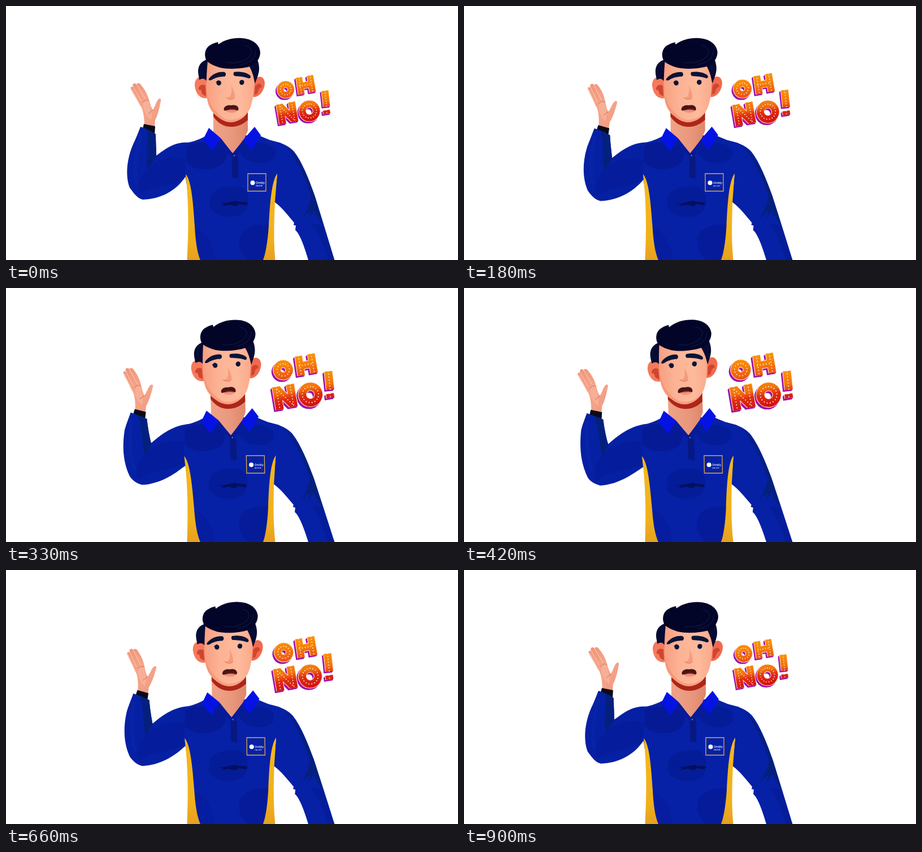
Recreate the animation shown at these times as an HTML page. Size 800 by 450 pixels, loop 0.93 s.

```html
<!DOCTYPE html>
<html lang="en">
<head>
<meta charset="utf-8">
<title>Oh no!</title>
<style>
html, body { margin: 0; width: 100%; height: 100%; overflow: hidden; background: #fff; }
svg { display: block; width: 100vw; height: 100vh; }
.line { fill: none; stroke-linecap: round; stroke-linejoin: round; }
.badge text { font-family: "Open Sans", sans-serif; font-weight: 600; fill: #fff; }
#sign use { fill: none; stroke-linejoin: round; stroke-linecap: butt; }
</style>
</head>
<body>
<svg viewBox="0 0 800 450" preserveAspectRatio="xMidYMid meet">
  <defs>
    <linearGradient id="face" x1="0" x2="1">
      <stop offset="0" stop-color="#f79f80"/><stop offset=".3" stop-color="#fcb294"/>
      <stop offset=".7" stop-color="#feba9c"/><stop offset="1" stop-color="#faa98a"/>
    </linearGradient>
    <linearGradient id="skin" x1="0" x2="1" y1="0" y2="1">
      <stop offset="0" stop-color="#f09378"/><stop offset=".5" stop-color="#f5a68b"/><stop offset="1" stop-color="#f09a80"/>
    </linearGradient>
    <linearGradient id="throat" x1="0" x2="1">
      <stop offset="0" stop-color="#f0a287"/><stop offset=".6" stop-color="#e8977c"/><stop offset="1" stop-color="#dd866b"/>
    </linearGradient>
    <linearGradient id="gold" x1="0" x2="0" y1="0" y2="1">
      <stop offset="0" stop-color="#f5b81c"/><stop offset=".75" stop-color="#f0b01c"/><stop offset="1" stop-color="#e6a020"/>
    </linearGradient>
    <linearGradient id="warm1" gradientUnits="userSpaceOnUse" x1="508" x2="514" y1="122" y2="163">
      <stop offset="0" stop-color="#fb9a08"/><stop offset=".45" stop-color="#f88208"/><stop offset="1" stop-color="#e84a16"/>
    </linearGradient>
    <linearGradient id="warm2" gradientUnits="userSpaceOnUse" x1="521" x2="530" y1="158" y2="208">
      <stop offset="0" stop-color="#fb9208"/><stop offset=".4" stop-color="#f27310"/><stop offset=".6" stop-color="#e02c12"/><stop offset="1" stop-color="#d00c10"/>
    </linearGradient>
    <path id="oh" d="M495 138.500a9.500 9.500 0 1 0 .1 0ZM518.500 126.500L523 156.500M538 123L543 152.500M520 142L541 138"/>
    <path id="no" d="M484 174L490 209M505.500 170L511.500 204.500M485.500 178L509.500 201M537 173.500a12.500 12.500 0 1 0 .1 0ZM564.500 150L567.500 178M567 184.500L568 191"/>
    <clipPath id="sleeveClip"><path class="sleeve"/></clipPath>
    <clipPath id="shirtClip">
      <path id="shirtShape" d="M354 230C343 236 333 240 321 242L317 299C325 345 330 390 333 450H466C466 390 470 340 480 297L487 243C473 240 460 235 447 229Z"/>
    </clipPath>
  </defs>

  <g id="hand">
    <path fill="url(#skin)" d="M245 213C245 198 243 186 239 178C232 166 224 154 221 147C219.500 143 223 141.500 226 145L224 141C224.500 136 229 136 231 139C232 135.500 237 136.500 239 140C245 147 250 155 253 166C255 173 257 180 260 184C264 178 266 169 269 166C272 162.500 275 164 274 168C272 179 269 193 264 202L263 215Z"/>
    <path fill="#f8b59c" d="M243 170C249 165 253 168 254 175C257 184 259 190 257 201C251 199 245 189 243 180Z" opacity=".7"/>
    <path class="line" stroke="#fbc3ae" stroke-width="1.200" d="M226 145L239 168M231 139L246 164M223 148L238 177"/>
    <path class="line" stroke="#dc7b66" stroke-width="1" d="M242 171C247 166 251 166 253 168M260 184C257 187 254 189 252 191"/>
    <path fill="#0a0b18" d="M244 209L264 213L263 229L241 222Z"/>
  </g>

  <path class="sleeve" fill="#0620a4"/>
  <g clip-path="url(#sleeveClip)">
    <path id="fold" fill="#04207f"/>
    <path id="elbow" fill="#051a92" opacity=".45"/>
    <path id="crease" class="line" stroke="#0a2cae" stroke-width="7" opacity=".3"/>
  </g>

  <g id="body">
    <path fill="#0620a6" d="M468 238C485 241 500 247 510 258C524 276 536 306 546 335C556 366 571 415 581.500 450H535C528 425 519 402 512 397L513 389L509 388L510 384C500 372 488 356 475 347L480 297Z"/>
    <path fill="#05207c" d="M497 250C522 270 535 308 546 335C552 353 558 376 562 388C555 382 550 372 546 362L535 378L540 363L524 375C533 364 537 350 540 338C531 308 517 276 497 250Z"/>
    <path fill="#051c92" d="M540 386C553 398 562 425 570 450H581L562 388Z" opacity=".6"/>
    <use href="#shirtShape" fill="#0620a6"/>
    <g clip-path="url(#shirtClip)" fill="#051a94">
      <path d="M318 250C335 236 365 242 386 250C397 264 388 282 368 287C344 293 322 286 318 272Z"/>
      <path d="M414 250C432 238 462 240 476 253C482 270 465 281 446 278C426 277 414 266 414 250Z" opacity=".7"/>
      <path d="M361 342C364 324 390 316 416 321C432 328 433 354 420 367C401 379 371 375 361 357Z" opacity=".7"/>
      <path d="M414 409C420 392 442 384 470 388V450H428C416 440 410 424 414 409Z" opacity=".65"/>
      <path d="M337 395C352 398 366 420 370 450H337Z" opacity=".4"/>
    </g>
    <path fill="#031060" d="M376 350L388 349L407 345L413 347L428 348L426 353L412 351L407 355L395 352L382 355L386 351Z"/>
    <path fill="#071981" d="M400 259L411 268V306L400 303Z"/>
    <circle cx="404" cy="265" r="1.300" fill="#6d79b8"/>
    <path fill="url(#gold)" d="M318 298C328 309 331 345 334 390C335.500 420 339 438 344 450H320.500C323 400 324 350 318 298Z"/>
    <path fill="url(#gold)" d="M480 297C470 310 467 350 465 390C463 420 459 440 455 450H476.500C473 410 475 375 476 347Z"/>
    <g class="badge">
      <rect x="428" y="297" width="32" height="31" fill="none" stroke="#e0aa3c" stroke-width="1.300"/>
      <circle cx="436.500" cy="313.300" r="4" fill="#fff"/>
      <text x="442" y="315.300" font-size="5">Ombly</text>
      <text x="442" y="320.300" font-size="3.200">ON SITE</text>
    </g>
  </g>

  <g id="collar">
    <path fill="url(#throat)" d="M367 184V225L380 236L401 261L421 237L428 221V184Z"/>
    <path fill="#ad2618" d="M367 186V196C377 210 388 214 399 214C412 214 421 208 428 202V184Z"/>
    <path fill="#0413e4" d="M359 216L380 234L366 257L349 236Z"/>
    <path fill="#0413e4" d="M440 214L451 229L434 256L420 237Z"/>
    <path fill="#061a9a" d="M380 234L401 261L400 267L374 244ZM420 237L402 261L408 266L425 244Z"/>
  </g>

  <g id="head">
    <path fill="#f57a5c" d="M357 131C347 121 334 125 334 140C335 154 343 166 357 163Z"/>
    <path fill="#f06a4d" d="M439 132C446 121 457 124 458 136C458 150 447 163 437 161Z"/>
    <path fill="#cf4630" d="M353 141C346 137 340 142 341 149C344 146 346 150 347 156L354 160ZM441 142C447 135 453 137 453 144C449 143 446 149 445 155L440 157Z"/>
    <path fill="#060b33" d="M358 94C346 97 340 105 340 116C340 122 342 127 342 131C348 127 352 129 355 133L361 104ZM444 93C448 101 449 112 447 119C446 125 443 130 441 137L426 102Z"/>
    <path fill="url(#face)" d="M357 97C355 118 354 140 355 156C356 175 362 187 373 195C382 203 391 206 399 206C412 205 423 197 430 185C436 174 438 160 440 137C439 124 434 112 428 102Z"/>
    <path fill="#f28565" d="M355 150C358 173 369 188 386 199C396 204 410 202 422 193C413 204 404 206 399 206C386 205 357 194 355 150Z" opacity=".5"/>
    <path fill="#020428" d="M357 99C350 92 350 75 362 69C367 66 371 65 375 64L376 68C388 59 403 56 417 57C436 58 449 68 450 82C450 93 443 102 432 107C418 111 396 113 378 109C369 106 362 103 357 99Z"/>
    <path class="line" stroke="#0a1038" stroke-width="2.200" d="M391 100C411 103 430 96 434 84C436 77 431 72 423 70M414 104C433 101 443 92 442 80"/>
    <g fill="#0a1437">
      <path d="M359 129C365 121 375 116 386 117C390 118 390 123 387 125C378 125 370 127 364 131C360 132.500 358 131.500 359 129Z"/>
      <path d="M404 117C414 115.500 426 117.500 432 123C434.500 126.500 432 129 429 128C421 125 412 124.500 405 124C402 123 402 118 404 117Z"/>
      <ellipse cx="376.700" cy="136.300" rx="4.200" ry="4.400"/>
      <ellipse cx="417.300" cy="135.300" rx="4.200" ry="4.400"/>
    </g>
    <path class="line" stroke="#0a1437" stroke-width="1.200" d="M372 135L376 132M421 133L417 131.500"/>
    <path fill="#f69b7d" d="M399 139C402 149 406 156 405 162C402 167 394 167 389 162C396 163 401 160 399 139Z"/>
    <path class="line" stroke="#e8775f" stroke-width="1" d="M390 162C394 166 401 166 404 163"/>
    <path fill="#f29079" d="M387 184C394 182 405 182 411 183C410 191 391 191 387 184Z"/>
    <path fill="#4a1415" d="M385.500 183C386 177 393 175 398 176C404 174.500 411 176 411.500 182C411.500 184 411 185 410 185C402 183.500 393 184 387 185.500C386 185 385.500 184 385.500 183Z"/>
    <path fill="#a8352f" d="M392 184C397 181.500 405 181.500 409 184.500C403 183.500 397 183.500 392 184Z"/>
  </g>

  <g id="sign" role="img" aria-label="OH NO!"></g>
</svg>
<script>
const LOOP = 930, STEP = 30, PEAK = 458;
const $ = q => document.querySelector(q);
const sleeves = document.querySelectorAll('.sleeve');

// Each bending shape: raised pose, then swung-out pose.
const bends = {
  sleeve: [
    'M238 214C248 217 257 221 265 227C265 240 266 253 266 265C280 255 298 240 322 242L330 270L318 302C303 325 277 342 242 343C232 341 225 330 219 322C212 305 212 275 225 245C230 235 234 224 238 214Z',
    'M217 222C227 226 237 229 246 233C248 249 251 264 255 277C268 265 293 244 322 241L330 270L318 317C303 326 277 348 241 350C229 347 222 341 219 336C204 305 205 275 207 252C210 240 214 231 217 222Z'],
  fold: [
    'M249 217L266 226L267 266L251 288C245 262 254 242 249 217Z',
    'M229 225L248 232L256 278L244 300C239 272 238 246 229 225Z'],
  elbow: [
    'M252 286C272 268 302 263 318 272L320 300C296 322 262 316 237 334C228 318 238 300 252 286Z',
    'M244 296C264 277 296 266 318 274L320 308C296 327 258 322 235 341C226 326 232 310 244 296Z'],
  crease: ['M238 230C232 254 226 280 230 312', 'M218 238C216 262 216 290 226 322']
};

function mix([a, b], k) {
  const to = b.match(/\d+/g);
  let i = 0;
  return a.replace(/\d+/g, n => (+n + (to[i++] - n) * k).toFixed(2));
}

// Marquee lettering: shadow, light rim, warm fill, bulbs.
function buildSign() {
  const words = [
    { href: '#oh', weight: 11, fill: 'url(#warm1)' },
    { href: '#no', weight: 12, fill: 'url(#warm2)' }
  ];
  const layers = [
    { stroke: '#8b12b8', grow: 1.6, transform: 'translate(-2.2 2.8)' },
    { stroke: '#b8128c', grow: 1.6, transform: 'translate(-1.1 1.4)' },
    { stroke: '#fff0e0', grow: 1.7 },
    { grow: 0 },
    { stroke: '#fff0c8', width: 1.8, 'stroke-dasharray': '0 4.6', 'stroke-linecap': 'round' }
  ];
  for (const { grow, width, ...look } of layers) {
    for (const { href, weight, fill } of words) {
      const el = document.createElementNS('http://www.w3.org/2000/svg', 'use');
      const attrs = { href, stroke: fill, ...look, 'stroke-width': width || weight + grow };
      for (const key in attrs) el.setAttribute(key, attrs[key]);
      if (width) el.style.strokeLinecap = 'round';
      $('#sign').append(el);
    }
  }
}

function draw(time) {
  const t = Math.floor((time % LOOP) / STEP) * STEP;
  const s = (1 + Math.cos((t - PEAK) / LOOP * 2 * Math.PI)) / 2;
  const lean = 0.021 * s;
  const set = (q, v) => $(q).setAttribute('transform', v);

  set('#body', `matrix(1 0 ${lean} 1 ${-450 * lean} 0)`);
  set('#collar', `rotate(${-2 * s ** 1.4} 400 375)`);
  set('#head', `rotate(${-3.05 * s ** 2.1} 397 320)`);
  set('#hand', `translate(${-20 * s} ${7 * s}) rotate(${20 * s * (1 - s)} 251 215)`);
  set('#sign', `translate(525 167) scale(${1 + 0.175 * s ** 0.85}) translate(-525 -167)`);

  const arm = mix(bends.sleeve, s);
  sleeves.forEach(el => el.setAttribute('d', arm));
  for (const id of ['fold', 'elbow', 'crease']) $('#' + id).setAttribute('d', mix(bends[id], s));
}

buildSign();
const start = performance.now();
draw(0);
requestAnimationFrame(function tick() {
  draw(performance.now() - start);
  requestAnimationFrame(tick);
});
</script>
</body>
</html>
```
